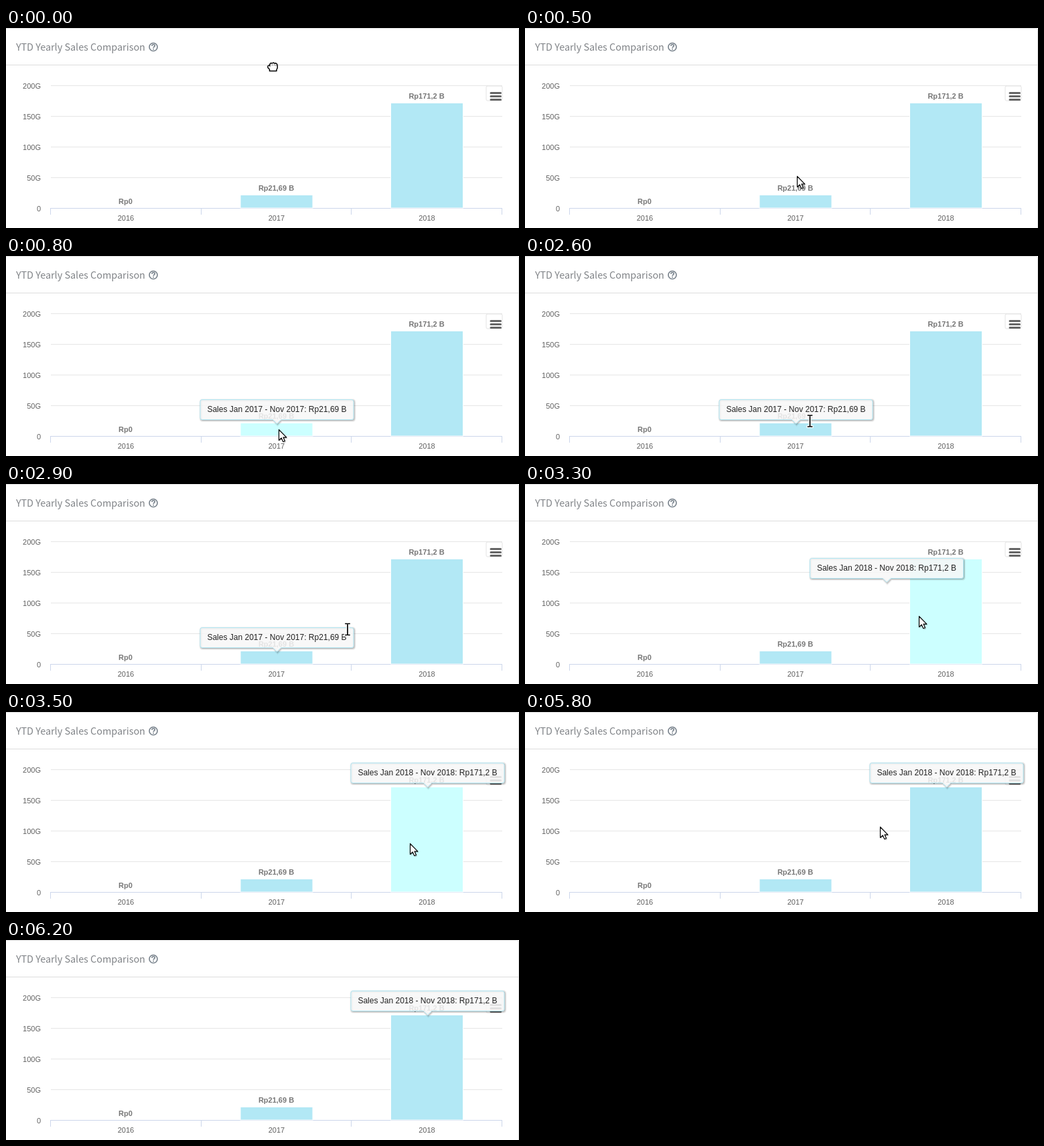
Write an HTML page that moves like this. It is 766x300 px and loops after 6600 ms.

```html
<!DOCTYPE html>
<html lang="en">
<head>
<meta charset="utf-8">
<title>Yearly sales chart</title>
<style>
  html, body { margin: 0; width: 100%; height: 100%; overflow: hidden; background: #fff; }
  svg { display: block; width: 766px; height: 300px; }
  text { font: 11px "Liberation Sans", Arial, sans-serif; fill: #606060; }
  .title { font: 14.4px "Noto Sans CJK JP", "Noto Sans CJK SC", sans-serif; fill: #818488; }
  .value { font-weight: bold; fill: #777; text-anchor: middle; }
  .middle { text-anchor: middle; }
  .end { text-anchor: end; }
  #tip text { font-size: 12px; fill: #222; text-anchor: middle; }
  #tip path { fill: none; stroke: #000; }
  #tip path.face { fill: #f7f7f7; fill-opacity: .85; stroke: #b2e8f5; }
</style>
</head>
<body>
<svg viewBox="0 0 766 300">
  <rect x="-5" y=".5" width="770.5" height="310" rx="3" fill="#fff" stroke="#ddd"/>
  <path d="M0 55.5H765" stroke="#ddd"/>
  <text class="title" x="15" y="34">YTD Yearly Sales Comparison</text>
  <g fill="none" stroke="#76808a" stroke-width="1.6">
    <circle cx="220" cy="28.5" r="6"/>
    <path d="M217.8 27q.2-2.2 2.3-2.2 2.2 0 2.2 1.7 0 1-1.2 1.7-1 .6-1 1.5M220.1 30.7v1.7"/>
  </g>
  <g id="axes" fill="none"></g>
  <g id="bars" stroke="#fff"></g>
  <rect x="717" y="87" width="24" height="22" rx="2" fill="#fff" stroke="#e3e3e3"/>
  <path d="M724 97.5h14.5m-14.5 5h14.5m-14.5 5h14.5" stroke="#666" stroke-width="3" stroke-linecap="round"/>
  <g id="labels"></g>
  <g id="tip">
    <path transform="translate(1 1)" stroke-opacity=".05" stroke-width="5"/>
    <path transform="translate(1 1)" stroke-opacity=".1" stroke-width="3"/>
    <path transform="translate(1 1)" stroke-opacity=".15"/>
    <path class="face"/>
    <text y="19"></text>
  </g>
  <g id="arrow" stroke-linejoin="round">
    <path d="M1.5 1.5v17l4-3.8 2.6 5.8 3-1.3-2.5-5.5h5z" fill="#000" opacity=".2"/>
    <path d="M.5 .5v16l3.7-3.5 2.6 5.7 2.7-1.2-2.5-5.4h4.9z" fill="#fff" stroke="#000" stroke-width="1.2"/>
  </g>
  <g id="beam" fill="none" stroke-linecap="square">
    <path d="M-3-8.5h2L0-8l1-.5h2M0-8V8M-3 8.5h2L0 8l1 .5h2" stroke="#fff" stroke-width="4"/>
    <path d="M-3-8.5h2L0-8l1-.5h2M0-8V8M-3 8.5h2L0 8l1 .5h2" stroke="#000" stroke-width="1.7"/>
  </g>
  <g id="hand" stroke="#000" stroke-linejoin="round" stroke-linecap="round">
    <path d="M-4.5 6.5V4L-7 1.5V-1l1.5-1H-4v-2l1.5-1.5L-.5-5 1-6l2 1 2-.3 1.5 1.3.8 2V2L6 4.5v2z" fill="#fff" stroke-width="1.5"/>
    <path d="M-4-2v2M-.7-3v1M2.3-3v1M5-2.5v1" fill="none" stroke-width=".8"/>
  </g>
</svg>
<script>
const LOOP = 6600, STEP = 100;
const BAR = '#b2e8f5', BAR_HOVER = '#ccffff';
const byId = id => document.getElementById(id);

function add(parent, tag, attrs, content = '') {
  const node = document.createElementNS('http://www.w3.org/2000/svg', tag);
  for (const key in attrs) node.setAttribute(key, attrs[key]);
  node.textContent = content;
  byId(parent).append(node);
  return node;
}

['200G', '150G', '100G', '50G', '0'].forEach((name, i) => {
  const y = 86.5 + i * 46;
  add('axes', 'path', { d: `M67 ${y}H741`, stroke: i < 4 ? '#e6e6e6' : '#ccd6eb' });
  add('labels', 'text', { class: 'end', x: 52, y: y + 4.5 }, name);
});
for (const x of [66.5, 291.5, 515.5, 740.5]) {
  add('axes', 'path', { d: `M${x} 270v10`, stroke: '#ccd6eb' });
}

const years = [
  { name: '2016', value: 'Rp0', x: 179, top: 270 },
  { name: '2017', value: 'Rp21,69 B', x: 404, top: 251 },
  { name: '2018', value: 'Rp171,2 B', x: 628.5, top: 113 }
];
for (const year of years) {
  const { name, value, x, top } = year;
  if (top < 270) {
    year.bar = add('bars', 'rect', { x: x - 54, y: top - .5, width: 108, height: 270.5 - top });
  }
  add('labels', 'text', { class: 'middle', x, y: 289 }, name);
  add('labels', 'text', { class: 'value', x: x - .5, y: top - (top < 270 ? 7 : 6) }, value);
}

// Callout box with its pointer, centred on x = 0
const callout = 'M-111.5.5h223q3 0 3 3v24q0 3-3 3H6l-6 6-6-6h-105.5q-3 0-3-3v-24q0-3 3-3z';
document.querySelectorAll('#tip path').forEach(path => path.setAttribute('d', callout));

// Pointer steps: time, shape, x, y
const pointer = [
  [0, 'hand', 398, 58], [100, 'arrow', 400, 68], [200, 'arrow', 402, 97],
  [300, 'arrow', 404, 137], [400, 'arrow', 405, 180], [500, 'arrow', 406, 222],
  [600, 'arrow', 407, 252], [700, 'arrow', 407, 255], [800, 'arrow', 407, 260],
  [2600, 'beam', 425.5, 247.5], [2700, 'beam', 451, 237], [2800, 'beam', 480, 227],
  [2900, 'beam', 510, 218], [3000, 'arrow', 536, 209], [3100, 'arrow', 557, 202],
  [3200, 'arrow', 571, 198], [3300, 'arrow', 588, 198], [3400, 'arrow', 600, 197],
  [3500, 'arrow', 603, 197], [5800, 'arrow', 530, 172], [5900, 'arrow', 418, 125],
  [6000, 'arrow', 300, 73], [6100, 'hand', 143, 14], [6200, '', 0, 0]
];
// Tooltip steps: time, year index, centre x, top y
const tooltip = [
  [0, 0, 0, 0], [600, 1, 404.5, 215], [3300, 2, 540, 111],
  [3400, 2, 614, 80], [3500, 2, 629.5, 76]
];
// Hovered year steps: time, year index
const hover = [[0, 0], [600, 1], [2600, 0], [3300, 2], [5800, 0]];

const at = (steps, time) => steps.findLast(step => step[0] <= time);

function place(id, visible, x, y) {
  byId(id).setAttribute('transform', `translate(${x} ${y})`);
  byId(id).style.display = visible ? '' : 'none';
}

function draw() {
  const time = Math.floor(performance.now() % LOOP / STEP) * STEP;
  const [, shape, x, y] = at(pointer, time);
  for (const id of ['arrow', 'beam', 'hand']) place(id, id === shape, x, y);

  const [, index, tipX, tipY] = at(tooltip, time);
  const { name, value } = years[index];
  place('tip', index > 0, tipX, tipY);
  document.querySelector('#tip text').textContent = `Sales Jan ${name} - Nov ${name}: ${value}`;

  const active = at(hover, time)[1];
  years.forEach(({ bar }, i) => bar?.setAttribute('fill', i === active ? BAR_HOVER : BAR));
  requestAnimationFrame(draw);
}
draw();
</script>
</body>
</html>
```
